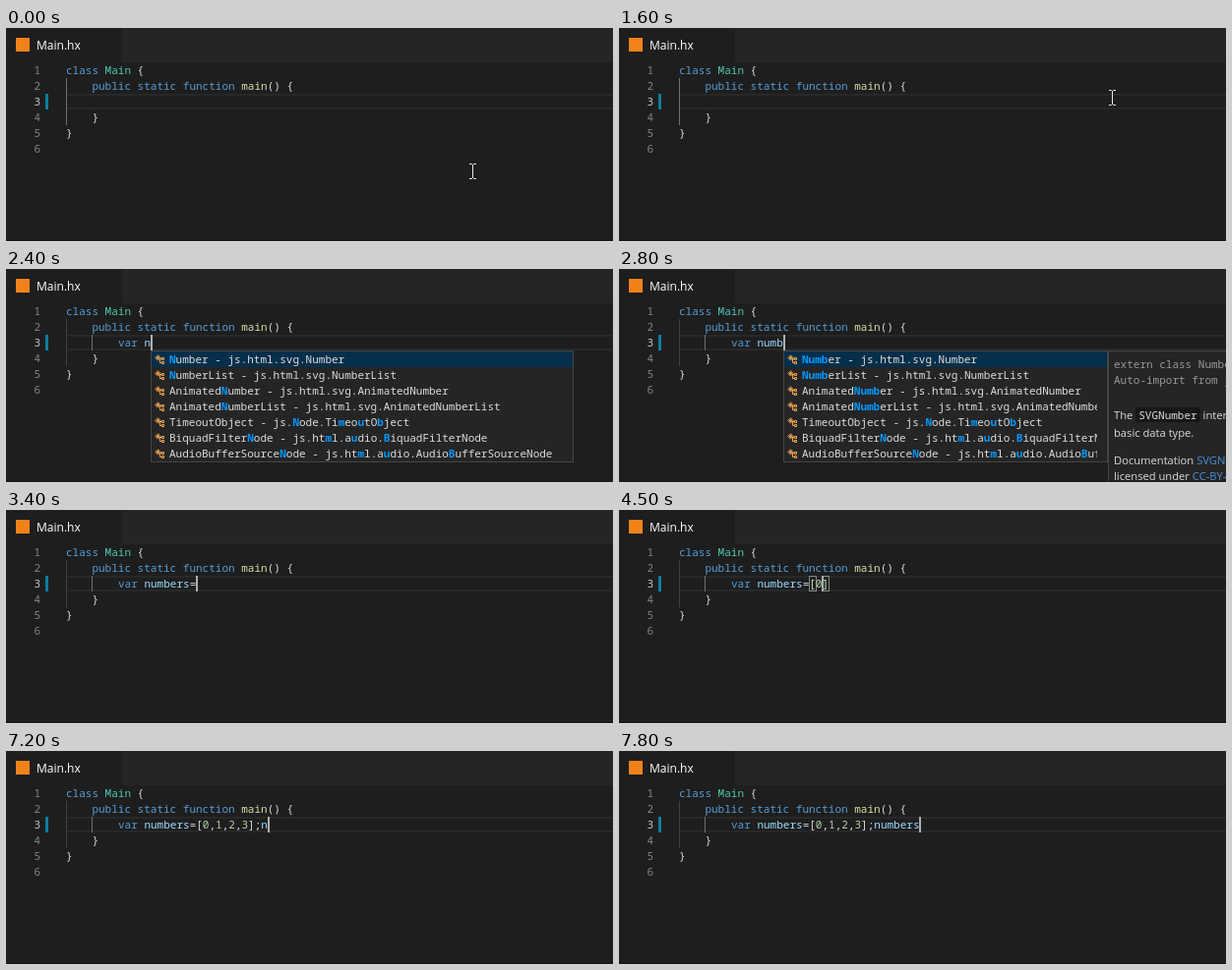
Animation of 617x217 px, one loop 8 s. Source, as an HTML page:

```html
<!DOCTYPE html>
<html lang="en">
<head>
<meta charset="utf-8">
<title>Code completion</title>
<style>
html, body { margin: 0; width: 100%; height: 100%; overflow: hidden; background: #1e1e1e; }
#stage { position: relative; width: 617px; height: 217px; overflow: hidden; color: #dcdcdc;
  font: 500 11px/16px "Noto Sans Mono", "DejaVu Sans Mono", monospace; white-space: pre; }
#stage div, #stage svg { position: absolute; }
#live, #mouse { left: 0; top: 0; }
.tabs { left: 118px; right: 0; top: 0; height: 35px; background: #252526; }
.logo { left: 10px; top: 10px; width: 14px; height: 14px; background: #f0821a; }
.name { left: 31px; top: 0; color: #fff; font: 500 12px/35px "Open Sans", "Noto Sans", sans-serif; }
.bottom { left: 0; right: 0; top: 216px; height: 1px; background: #141214; }
.nums { left: 0; top: 35px; width: 35px; text-align: right; color: #858585; }
.nums b { font-weight: inherit; color: #c6c6c6; }
.line { left: 61px; right: 0; top: 67px; height: 12px; border: solid #282828; border-width: 2px 0; }
.git { left: 40px; top: 67px; width: 3px; height: 16px; background: #0c7d9d; }
.guide { width: 1px; background: #404040; }
.active { background: #707070; }
.code { left: 61px; top: 35px; }
.typed { left: 114px; top: 67px; }
.match { top: 67px; width: 6px; height: 14px; border: 1px solid #888; background: #0064001a; }
.caret { top: 67px; width: 2px; height: 16px; background: #aeafad; }
.k { color: #569cd6; } .t { color: #4ec9b0; } .f { color: #dcdcaa; }
.v { color: #9cdcfe; } .n { color: #b5cea8; }
.popup, .docs { box-sizing: border-box; top: 83px; overflow: hidden; background: #252526; border: 1px solid #454545; }
.row { left: 0; right: 0; height: 16px; }
.row:first-child { background: #062f4a; }
.row svg { left: 3px; top: 3px; }
.row span { position: absolute; left: 18px; right: 10px; overflow: hidden; }
.row b { color: #0097fb; }
.scroll { right: 0; top: 0; width: 10px; height: 104px; background: #79797966; }
.docs { width: 300px; height: 150px; }
.docs div { left: 5px; }
.sig { color: #989898; }
.prose { font: 500 11.2px/16px "Open Sans", "Noto Sans", sans-serif; }
.tall { line-height: 18px; }
.prose code { font: 500 11px/16px "Noto Sans Mono", monospace; background: #171717; padding: 0 3px; border-radius: 3px; }
.prose i { font-style: normal; color: #4690d8; }
</style>
</head>
<body>
<div id="stage">
  <div class="tabs"></div><div class="logo"></div><div class="name">Main.hx</div>
  <div class="line"></div>
  <div class="nums">1
2
<b>3</b>
4
5
6</div>
  <div class="git"></div>
  <div class="code"><span class="k">class</span> <span class="t">Main</span> {
    <span class="k">public static function</span> <span class="f">main</span>() {

    }
}</div>
  <div id="live"></div>
  <div class="bottom"></div>
  <svg id="mouse" width="9" height="16" fill="none" stroke="#e8e8e8"><path d="M1 .5h2.5l1 1l1-1H8M4.5 1v14M1 15.5h2.5l1-1l1 1H8"/></svg>
</div>
<script>
const LOOP = 8000, STEP = 100, CHAR = 6.6, LEFT = 114;
const live = document.getElementById('live'), mouse = document.getElementById('mouse');

const icons = {
  k: ['#b8b8b8', 'M0 1.5h4M6 1.5h4M0 4.5h2M4 4.5h6M0 8.5h6M8 8.5h2'],
  s: ['#75beff', 'M0 1.5h10M0 2.5h10M0 3.5h10M0 6.5h4M0 7.5h4M0 8.5h4M6 6.5h4M6 7.5h4M6 8.5h4'],
  e: ['#e8a95c', 'M4.5 4V.5h5v5H7M4.5 1.5h5M.5 4.5h5v5h-5zM2 7h2'],
  c: ['#f0a94e', 'M.8 3.5L3.5.8L6 3.5L3.5 6zM2 3.5h3M3.5 2v3M5 4.5h2M5.5 5v3.5H7M7.5 3.5h2v2h-2zM7.5 7.5h2v2h-2z'],
  i: ['#75beff', 'M.5 3.5h2v3h-2zM3 5h3M6.5 3.5h3v3h-3z'],
  v: ['#75beff', 'M3 1.5H.5v7H3M7 1.5h2.5v7H7M3.5 4.5h3v1h-3z']
};

// First letter picks the icon, tildes enclose matched letters.
const varList = `k~var~
s~Var~ - haxe.macro.Expr.Var
e~Var~Access - haxe.macro.Type.VarAccess
cAs~Var~ - haxe.extern.AsVar
c~V~ertex~Ar~rayObjectOES - js.html.webgl.VertexArrayObjectOES
sJson~Var~Access - haxe.display.JsonModuleTypes.JsonVarAccess
eJson~Var~AccessKind - haxe.display.JsonModuleTypes.JsonVarAccessKind
iArrayBufferViewData - haxe.io.ArrayBuffer~V~iew.~Ar~rayBufferView
cExtension~V~ertex~Ar~rayObject - js.html.webgl.extension.VertexArray`.split('\n');
const numList = `cNumber - js.html.svg.Number
cNumberList - js.html.svg.NumberList
cAnimatedNumber - js.html.svg.AnimatedNumber
cAnimatedNumberList - js.html.svg.AnimatedNumberList
cTimeoutObject - js.~N~ode.Ti~m~eo~u~tO~b~ject
cBiquadFilter~N~ode - js.ht~m~l.a~u~dio.~B~iquadFilterNode
cAudioBufferSource~N~ode - js.ht~m~l.a~u~dio.Audio~B~ufferSourceNode`.split('\n');

function numRows(word, local) {
  const rows = word.length > 4 ? numList.slice(0, 4) : numList;
  const mark = row => row.replace(/number/i, m => '~' + m.slice(0, word.length) + '~' + m.slice(word.length));
  return (local ? ['vnumbers', ...rows] : rows).map(mark);
}

// [time, text, characters after the caret, popup]
const s = 'var numbers=', full = s + '[0,1,2,3];';
const events = [
  [1100, ''], [1800, 'v'], [1900, 'va', 0, 'var'], [2000, 'var', 0, 'var'],
  [2200, 'var '], [2300, 'var n'], [2400, 'var n', 0, 'num'], [2500, 'var nu', 0, 'num'],
  [2600, 'var num', 0, 'num'], [2700, 'var numb', 0, 'num'], [2800, 'var numb', 0, 'docs'],
  [2900, 'var numbe', 0, 'docs'], [3000, 'var number', 0, 'docs'], [3100, 'var numbers', 0, 'docs'],
  [3400, s], [3900, s + '[]', 1], [4400, s + '[0]', 1], [4900, s + '[0,]', 1],
  [5000, s + '[0,1]', 1], [5100, s + '[0,1,]', 1], [5200, s + '[0,1,2]', 1],
  [5900, s + '[0,1,2,]', 1], [6000, s + '[0,1,2,3]', 1], [6400, s + '[0,1,2,3]'],
  [6900, full], [7200, full + 'n'], [7300, full + 'n', 0, 'local'], [7400, full + 'nu', 0, 'local'],
  [7500, full + 'num', 0, 'local'], [7700, full + 'numb', 0, 'local'], [7800, full + 'numbers']
];

const box = (cls, style, html = '') => `<div class="${cls}" style="${style}">${html}</div>`;
const column = n => Math.round(LEFT + n * CHAR);

const colour = text => text.replace(/[a-z]+|\d/g, w =>
  `<span class="${w === 'var' ? 'k' : /\d/.test(w) ? 'n' : 'v'}">${w}</span>`);

function row(item, i) {
  const [ink, path] = icons[item[0]];
  const text = item.slice(1).replace(/~(.*?)~/g, '<b>$1</b>');
  return box('row', `top:${i * 16}px`,
    `<svg width="10" height="10" fill="none" stroke="${ink}"><path d="${path}"/></svg><span>${text}</span>`);
}

function popup(kind, text, x) {
  const word = text.match(/[a-z]*$/)[0], docs = kind === 'docs';
  const rows = kind === 'var' ? varList : numRows(word, kind === 'local');
  const width = docs ? 330 : 430;
  const scroll = kind === 'var' ? box('scroll', '') : '';
  let html = box('popup', `left:${x}px;width:${width}px;height:${rows.length * 16 + 2}px`,
    rows.map(row).join('') + scroll);
  if (docs) html += box('docs', `left:${x + width}px`,
    box('sig', 'top:5px', 'extern class Number\nAuto-import from js.html.svg.Number') +
    box('prose tall', 'top:56px', 'The <code>SVGNumber</code> interface\nbasic data type.') +
    box('prose', 'top:103px', 'Documentation <i>SVGNumber</i>\nlicensed under <i>CC-BY-SA</i>'));
  return html;
}

function editor(t) {
  const typing = t >= 1800;
  let html = box(typing ? 'guide' : 'guide active', 'left:61px;top:51px;height:48px');
  if (typing) html += box('guide active', 'left:87px;top:67px;height:16px');
  const event = events.findLast(e => e[0] <= t);
  if (!event) return html;
  const [start, text, after = 0, kind] = event;
  const x = column(text.length - after);
  if (t >= 4000 && t < 7000)
    for (const c of '[]') html += box('match', `left:${column(text.indexOf(c))}px`);
  html += box('typed', '', colour(text));
  if ((t - start) % 1000 < 500) html += box('caret', `left:${x}px`);
  return kind ? html + popup(kind, text, x) : html;
}

function glide(t, from, to) {
  const p = Math.min(1, Math.max(0, (t - from) / (to - from)));
  return p * p * (3 - 2 * p);
}

function moveMouse(t) {
  const a = glide(t, 0, 500), b = glide(t, 600, 1300);
  const x = 474 - 46 * a + 73 * b, y = 146 - 58 * a - 17 * b;
  mouse.style.transform = `translate(${Math.round(x) - 4}px,${Math.round(y) - 8}px)`;
  mouse.style.visibility = t < 1800 ? 'visible' : 'hidden';
}

let last = -1;
const begin = performance.now();
function draw(now) {
  const t = Math.floor(Math.max(0, now - begin) % LOOP / STEP) * STEP;
  if (t !== last) {
    live.innerHTML = editor(t);
    moveMouse(t);
    last = t;
  }
  requestAnimationFrame(draw);
}
draw(begin);
</script>
</body>
</html>
```
